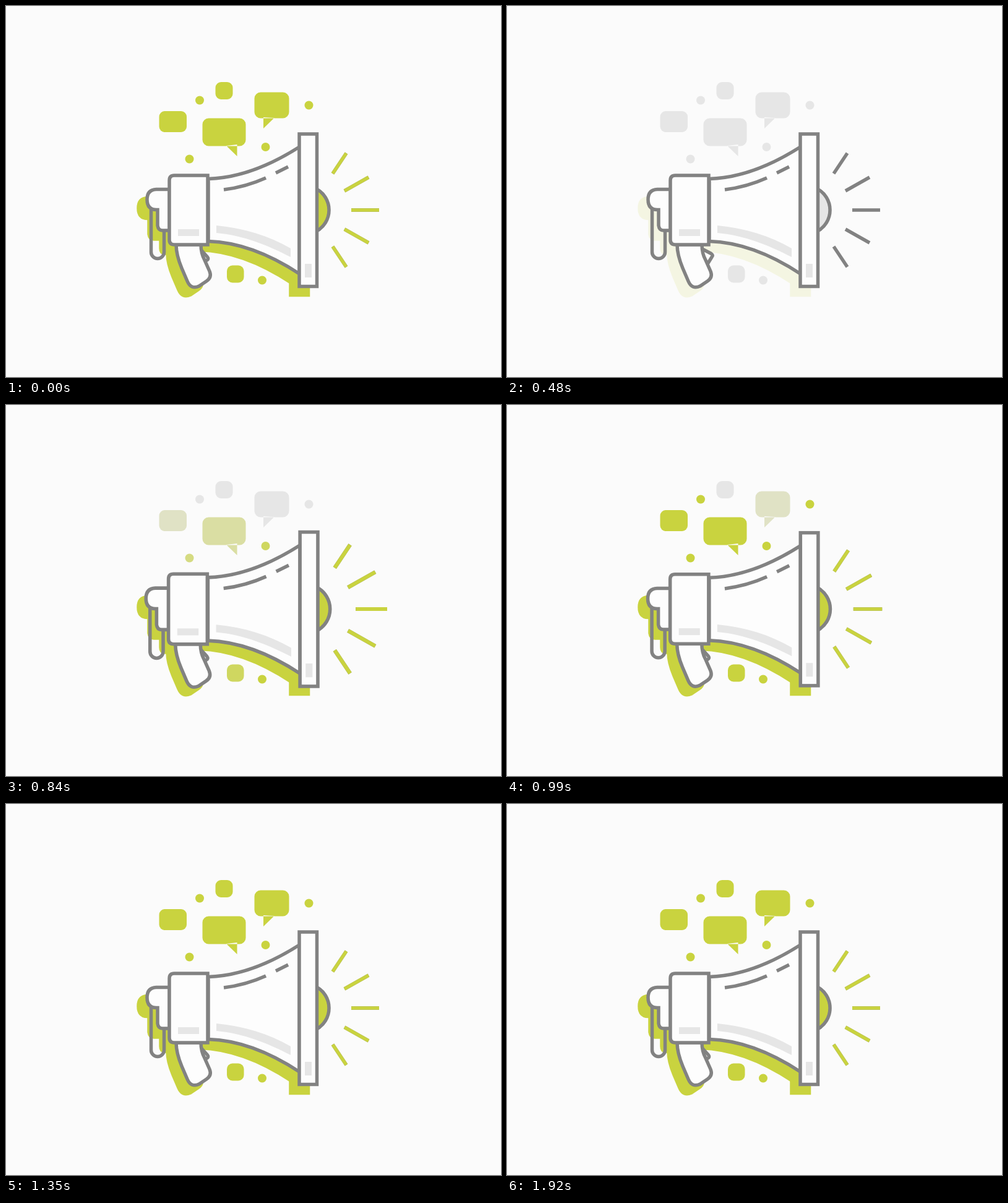
An HTML page for the animation above (2040 ms loop, 800x600 px).

```html
<!DOCTYPE html>
<html lang="en">
<head>
<meta charset="utf-8">
<title>Megaphone</title>
<style>
  html, body { margin: 0; width: 100%; height: 100%; overflow: hidden; background: #fbfbfb; }
  svg { display: block; width: 100vw; height: 100vh; }
  .line { stroke: #828282; stroke-width: 5.5; fill: none; }
  .solid { stroke: #828282; stroke-width: 5.5; fill: #fdfdfd; }
  .pale { fill: #e6e6e6; }
  .shade { fill: #c9d33f; stroke: #c9d33f; stroke-width: 5.5; }
</style>
</head>
<body>
<svg viewBox="0 0 800 600">
  <defs>
    <clipPath id="lower"><rect y="300" width="800" height="300"/></clipPath>
    <path id="grip" d="M275 386C275 400 279 412 284 424L293 445Q299 459 312 453L324 445Q333 439 329 429L321 411Q315 400 315 386Z"/>
    <path id="trigger" d="M310 390L330 400.5Q334 403 331 406L323 419"/>
    <g id="shell">
      <path d="M264 296.5H243Q228 297 228 313Q228 329.5 243 329.5H245V355Q246 363 253 363H264Z"/>
      <path d="M327 279.5C380 278 430 256 474 228V433C430 404 380 382 327 380.5Z"/>
      <path d="M326 274H272Q264 274 264 282V378Q264 386 272 386H326Z"/>
      <rect x="474" y="207" width="28.5" height="246.5"/>
    </g>
  </defs>

  <g id="bubbles"></g>

  <g id="shadow" clip-path="url(#lower)">
    <g class="shade" transform="translate(-14 14)">
      <use href="#grip"/>
      <use href="#shell"/>
    </g>
  </g>

  <g id="rays"></g>

  <g id="horn">
    <path class="line" d="M234.5 329V398a10.5 10.5 0 0 0 21 0V364"/>
    <use id="released" class="solid" href="#trigger"/>
    <use id="pressed" class="solid" href="#trigger" transform="rotate(20 313 390)"/>
    <use class="solid" href="#grip"/>
    <path id="bulb" class="line" d="M503 296.500A39 39 0 0 1 503 363.500"/>
    <use class="solid" href="#shell"/>
    <path class="line" d="M352 297C377 294 400 287 420 278M436 270L456 260"/>
    <path class="pale" d="M340 355C385 359 425 372 460 392V406C425 388 385 371 340 367Z"/>
    <rect class="pale" x="278" y="361" width="34" height="11"/>
    <rect class="pale" x="483" y="417" width="11" height="22"/>
  </g>
</svg>

<script>
const LOOP = 2040, STEP = 30;
const GREEN = [201, 211, 63], PALE = [230, 230, 230];
const byId = id => document.getElementById(id);

function add(parent, tag, attrs) {
  const el = document.createElementNS('http://www.w3.org/2000/svg', tag);
  for (const name in attrs) el.setAttribute(name, attrs[name]);
  return parent.appendChild(el);
}

const ramp = (t, start, length) => Math.min(1, Math.max(0, (t - start) / length));
const mix = (from, to, k) => `rgb(${from.map((v, i) => Math.round(v + (to[i] - v) * k))})`;

const box = (x, y, w, h, r) =>
  `M${x + r} ${y}h${w - 2 * r}a${r} ${r} 0 0 1 ${r} ${r}v${h - 2 * r}a${r} ${r} 0 0 1 ${-r} ${r}` +
  `h${2 * r - w}a${r} ${r} 0 0 1 ${-r} ${-r}v${2 * r - h}a${r} ${r} 0 0 1 ${r} ${-r}z`;
const dot = (x, y) => box(x - 7, y - 7, 14, 14, 7);

// Each bubble: outline and the time its colour comes back
const bubbles = [
  [dot(414, 443.5), 690],
  [box(357, 419.5, 27.5, 28, 9), 720],
  [dot(419.5, 228), 720],
  [dot(296.5, 247.5), 750],
  [box(317.5, 181.5, 70, 45, 10) + 'M356 226L373.5 243V224z', 780],
  [box(247.5, 170, 44.5, 34, 9), 810],
  [dot(313, 152.5), 840],
  [dot(489.5, 160.5), 840],
  [box(401.5, 139.5, 56, 42, 10) + 'M416 180V198L433.500 181z', 960],
  [box(338.5, 123, 28, 28, 9), 1080],
].map(([d, start]) => ({ el: add(byId('bubbles'), 'path', { d }), start }));

// Each ray: end points and how long the colour takes to run along it
const rays = [
  [528, 271, 550, 238, 111],
  [547, 299, 586, 277, 117],
  [558, 330, 603, 330, 135],
  [547, 361, 586, 383, 117],
  [528, 389, 550, 422, 111],
].map(([x1, y1, x2, y2, time]) => {
  const line = { x1, y1, x2, y2, class: 'line' };
  add(byId('rays'), 'line', line);
  const el = add(byId('rays'), 'line', line);
  el.style.stroke = `rgb(${GREEN})`;
  return { el, x1, y1, x2, y2, time };
});

const zoom = (s, x, y) => `translate(${x} ${y}) scale(${s}) translate(${-x} ${-y})`;

function draw(t) {
  const fade = 1 - ramp(t, 0, 300);

  for (const { el, start } of bubbles)
    el.setAttribute('fill', mix(PALE, GREEN, Math.max(fade, ramp(t, start, 150))));

  byId('shadow').setAttribute('opacity', Math.max(fade, ramp(t, 450, 240)));
  byId('bulb').style.fill = mix(PALE, GREEN, Math.max(fade, ramp(t, 540, 120)));

  byId('pressed').setAttribute('opacity', fade);
  byId('released').setAttribute('opacity', 1 - fade);
  byId('released').setAttribute('transform', `rotate(${20 * ramp(t, 480, 120)} 313 390)`);

  for (const { el, x1, y1, x2, y2, time } of rays) {
    const run = t < 300 ? 1 : ramp(t, 600, time);
    el.setAttribute('x2', x1 + (x2 - x1) * run);
    el.setAttribute('y2', y1 + (y2 - y1) * run);
    el.setAttribute('opacity', t < 300 ? fade : run > 0 ? 1 : 0);
  }

  const rise = Math.sin(ramp(t, 735, 105) * Math.PI / 2);
  const kick = rise * (1 - ramp(t, 840, 300)) ** 2;
  byId('rays').setAttribute('transform', zoom(1 + 0.13 * kick, 503, 330));
  byId('horn').setAttribute('transform', zoom(1 + 0.012 * kick, 380, 330));
}

const origin = performance.now();
function tick() {
  const t = (performance.now() - origin) % LOOP;
  draw(Math.floor(t / STEP) * STEP);
  requestAnimationFrame(tick);
}
tick();
</script>
</body>
</html>
```
